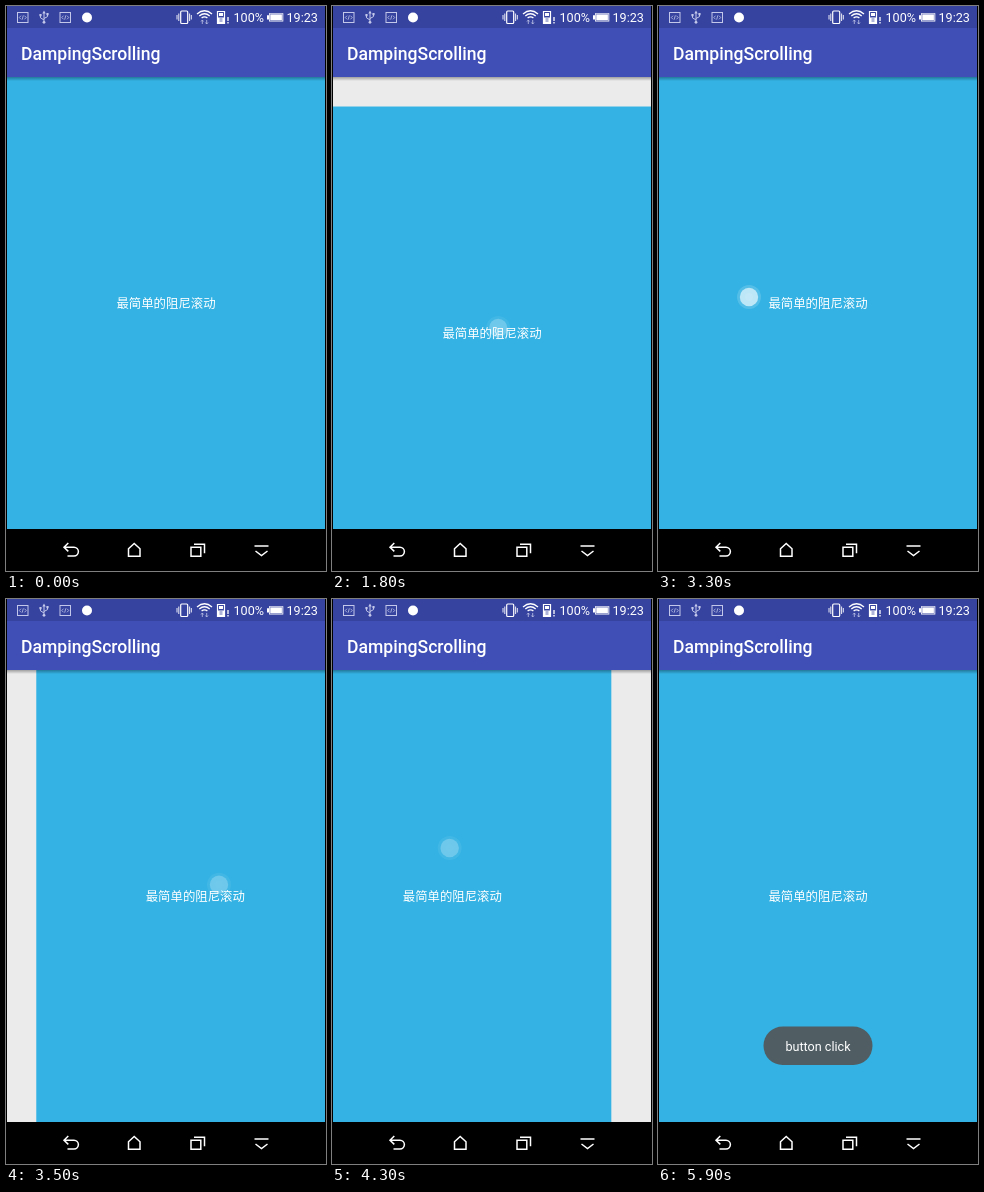
Animation, 320 px wide and 565 px high, one loop 6.4 s. Source, as an HTML page:

```html
<!DOCTYPE html>
<html lang="zh">
<head>
<meta charset="utf-8">
<title>DampingScrolling</title>
<style>
  html, body { margin: 0; width: 100%; height: 100%; overflow: hidden; background: #000; }
  svg { display: block; width: 100vw; height: 100vh; }
  text { font-family: Roboto, sans-serif; fill: #fff; }
  .cjk { font-family: "Noto Sans CJK SC", "Noto Sans CJK", sans-serif; font-size: 12.4px; }
  .line { fill: none; stroke: #fff; }
  .pale { fill: none; stroke: #c3c8ea; }
</style>
</head>
<body>
<svg viewBox="0 0 320 565" preserveAspectRatio="none">
  <defs>
    <linearGradient id="shade" x2="0" y2="1">
      <stop offset="0" stop-color="#000" stop-opacity=".32"/>
      <stop offset="1" stop-color="#000" stop-opacity="0"/>
    </linearGradient>
    <clipPath id="view"><rect x="1" y="71" width="318" height="452"/></clipPath>
    <g id="code">
      <rect x=".5" y=".5" width="10.5" height="10"/>
      <path d="M4 3.7 2.3 5.5 4 7.3M7.5 3.7 9.2 5.5 7.5 7.3M6.3 3.4 5.2 7.6" stroke-width=".8"/>
    </g>
  </defs>

  <rect width="320" height="565"/>
  <g clip-path="url(#view)">
    <rect x="1" y="71" width="318" height="452" fill="#ebebeb"/>
    <g id="page">
      <rect x="1" y="71" width="318" height="452" fill="#33b2e3"/>
      <text class="cjk" x="160" y="302" text-anchor="middle">最简单的阻尼滚动</text>
    </g>
  </g>

  <rect x="1" y="71" width="318" height="4" fill="url(#shade)"/>
  <rect x="1" y="21" width="318" height="50" fill="#3f4fb5"/>
  <rect x="1" width="318" height="22" fill="#36439f"/>
  <text x="15" y="53.5" font-size="17.6" font-weight="500">DampingScrolling</text>

  <g id="status">
    <use href="#code" x="11" y="6" class="pale"/>
    <use href="#code" x="53.5" y="6" class="pale"/>
    <path class="pale" d="M38 6V16M38 14 34.5 11.8V9.5M38 12.5 41.5 10.6V8.5"/>
    <path d="M36.3 7.5 38 4.5 39.7 7.5ZM33.4 8h2.2v2.2h-2.2ZM40.4 7h2.2v2.2h-2.2Z" fill="#c3c8ea"/>
    <circle cx="38" cy="16.3" r="1.4" fill="#c3c8ea"/>
    <circle cx="81" cy="11.5" r="5" fill="#fff"/>
    <rect class="line" x="174.7" y="5" width="7" height="12.5" rx="1" stroke-width="1.2"/>
    <path class="line" d="M172.8 7.5V15M183.6 7.5V15M171 9V13.5M185.3 9V13.5" stroke-width=".9"/>
    <path class="line" d="M191 8Q198.500 1.500 206 8M193.300 10Q198.500 5.500 203.700 10M195.600 12Q198.500 9.600 201.400 12" stroke-width="1.3"/>
    <path class="pale" d="M196.300 18V14.200M195 15.500 196.300 14 197.600 15.500M200.700 14V17.800M199.400 16.500 200.700 18 202 16.500" stroke-width=".8"/>
    <path class="line" d="M211.500 5.500H218.500V17.300H211.500Z" stroke-width="1.200"/>
    <path d="M213 7h4v3h-4ZM212 11.500h6v5.500h-6Z" fill="#fff"/>
    <path d="M213.500 13h3M213.500 15h3" stroke="#36439f" stroke-width=".8"/>
    <path class="line" d="M222 11V15M222 16V17.500" stroke-width="1.300"/>
    <text x="227.500" y="16" font-size="12.6">100%</text>
    <path d="M261 9.300h2V7.200h14.300v8.300H263v-2h-2Z" fill="#fff"/>
    <path d="M264 8.200h12.300v6.300H264Z" fill="none" stroke="#36439f" stroke-width=".5"/>
    <text x="280.500" y="16" font-size="12.6">19:23</text>
  </g>

  <g class="line" stroke-width="1.500">
    <path d="M62.300 537 58 541.200 62.300 545.400M58 541.200H68A4.400 4.400 0 0 1 68 550H61.500"/>
    <path d="M122.500 542.800 128.200 537.500 134 542.800V550.200H122.500Z"/>
    <path d="M185 541.200H194.800V550.200H185ZM188 538.300H198.500V547.300"/>
    <path d="M248.500 540H262.500M249.500 545 255.500 549.600 261.500 545"/>
  </g>

  <g id="toast" opacity="0">
    <rect x="105.500" y="427.500" width="109" height="38.500" rx="19.200" fill="#505e64"/>
    <text x="160" y="452" font-size="12.6" text-anchor="middle">button click</text>
  </g>
  <g id="touch" opacity="0" fill="#fff">
    <circle r="12" fill-opacity=".16"/>
    <circle r="9.200" fill-opacity=".62"/>
    <circle r="4" fill-opacity=".1"/>
  </g>
</svg>
<script>
const LOOP = 6400, STEP = 100, DAMP = 0.24;
const $ = id => document.getElementById(id);
const page = $('page'), touch = $('touch'), toast = $('toast');
const clamp = v => Math.max(0, Math.min(1, v));

// start, drag length in ms, touch point, total finger travel
const drags = [
  { at: 1500, len: 500, x: 165, y: 199, dx: 2, dy: 205 },
  { at: 2500, len: 300, x: 166, y: 375.500, dx: -2, dy: -205 },
  { at: 3300, len: 300, x: 91, y: 291, dx: 183, dy: -8 },
  { at: 4100, len: 300, x: 283, y: 255, dx: -248, dy: -9 },
  { at: 5200, len: 0, x: 165, y: 299, dx: 0, dy: 0 }
];

const move = (el, x, y) => el.setAttribute('transform', `translate(${x} ${y})`);
const fade = (el, v) => el.setAttribute('opacity', v);

function draw(t) {
  const d = drags.find(g => t >= g.at && t < g.at + g.len + STEP);
  let ox = 0, oy = 0;
  if (d) {
    const p = d.len ? clamp((t - d.at) / d.len) : 0;
    const mx = d.dx * p, my = d.dy * p;
    if (Math.abs(d.dx) > Math.abs(d.dy)) ox = mx * DAMP;
    else oy = my * DAMP;
    move(touch, d.x + mx, d.y + my);
    fade(touch, p ? 0.42 : 1);
  } else fade(touch, 0);
  move(page, ox, oy);
  fade(toast, clamp((t - 5300) / 600));
}

const begin = performance.now();
function tick() {
  const t = (performance.now() - begin) % LOOP;
  draw(Math.floor(t / STEP) * STEP);
  requestAnimationFrame(tick);
}
tick();
</script>
</body>
</html>
```
